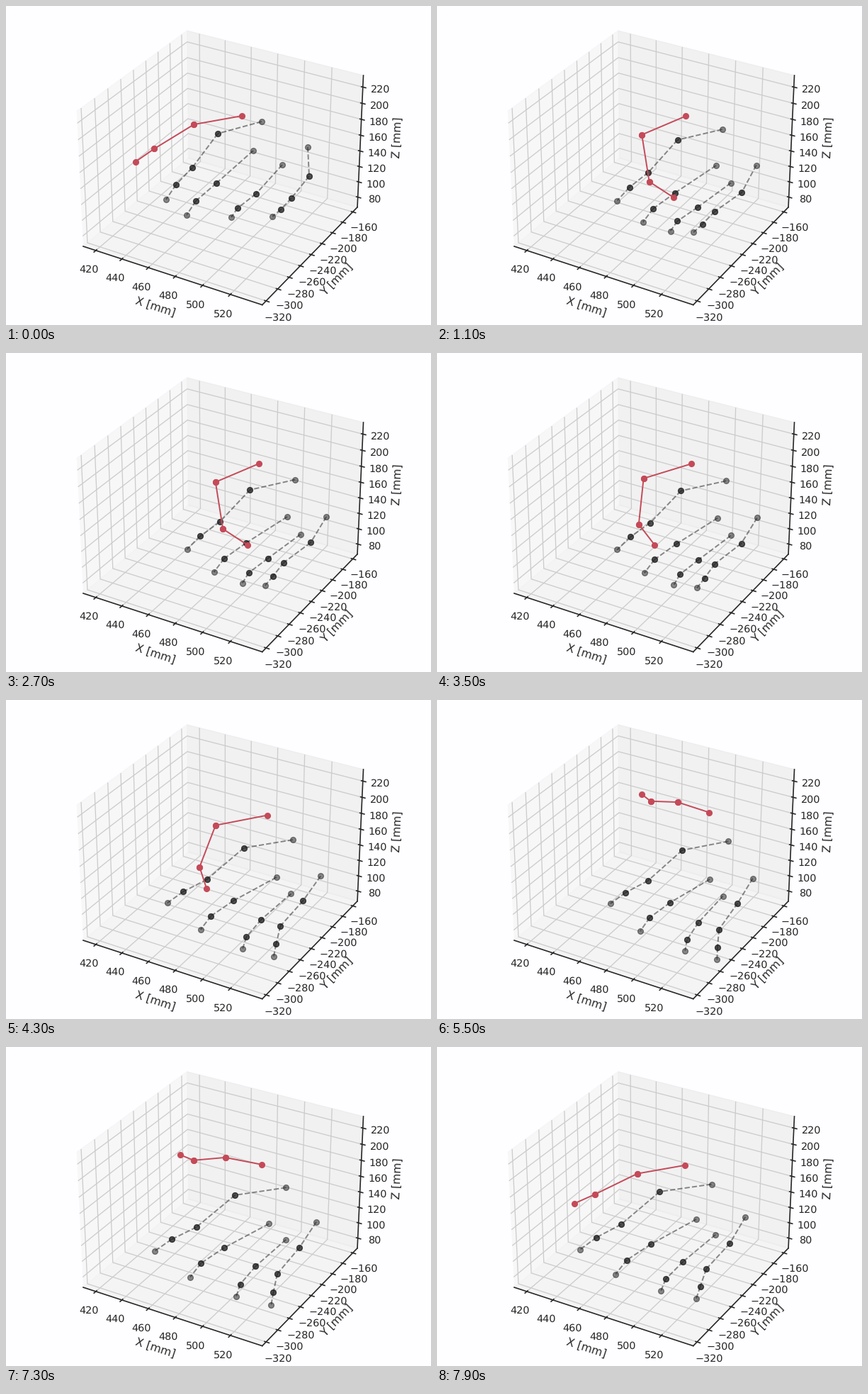
A matplotlib script that plays this animation: 600x450 px, repeating every 8000 ms.

```python
import numpy as np
import matplotlib.pyplot as plt
from matplotlib.animation import FuncAnimation

FRAMES, INTERVAL = 80, 100
W, H = 600, 450
RED, DARK, INK, PAPER = "#c54a58", ".1", ".15", "#fefdff"

plt.rcParams.update({
    "font.family": "DejaVu Sans", "text.hinting": "none",
    "axes.labelsize": 12, "axes.labelcolor": INK,
    "axes.edgecolor": INK, "axes.linewidth": 1.25,
    "axes.facecolor": PAPER, "figure.facecolor": PAPER,
    "grid.color": ".8", "grid.linewidth": 1,
    "xtick.labelsize": 11, "ytick.labelsize": 11,
    "xtick.color": INK, "ytick.color": INK,
    "xtick.major.width": 1.25, "ytick.major.width": 1.25,
    "lines.linewidth": 1.5, "lines.markersize": 6,
})

fig = plt.figure(figsize=(6.4, 4.8), dpi=93.75)

# Measuring volume
box = fig.add_axes([0, 0, 1, 1], projection="3d")
box.set(xlim=(410.2, 542.6), ylim=(-326.5, -150.7), zlim=(66.7, 234.2),
        xticks=range(420, 521, 20), yticks=range(-320, -159, 20),
        zticks=range(80, 221, 20),
        xlabel="X [mm]", ylabel="Y [mm]", zlabel="Z [mm]")

# Joints are complex numbers x + yj in stage pixels, y pointing down
stage = fig.add_axes([0, 0, 1, 1])
stage.set(xlim=(0, W), ylim=(H, 0))
stage.set_axis_off()


def hand_drift(t):
    """How far the hand has moved right, sunk and swung."""
    at = [0, 11, 27, 36, 43, 55, 66, 79]
    return np.array([np.interp(t, at, path) for path in (
        [0, 45, 48, 47, 33, 36, 28, 17],
        [0, 21, 27, 29, 46, 49, 53, 39],
        [0, -3, 0, 1, 4, 19, 7, -9])])


class Finger:
    """A chain whose two ends follow the hand while its bow flexes.

    The gains weigh right, sunk and swung for the knuckle and the tip.
    """

    def __init__(self, rest, knuckle_gain, tip_gain, bend):
        rest = np.array(rest)
        self.knuckle, self.tip = rest[0], rest[-1]
        self.shape = (rest - self.knuckle) / (self.tip - self.knuckle)
        self.bow = 1j * bend * np.sin(np.pi * self.shape.real)
        self.gains = np.array(knuckle_gain), np.array(tip_gain)

    def joints(self, t):
        drift = hand_drift(t)
        knuckle = self.knuckle + self.gains[0] @ drift
        tip = self.tip + self.gains[1] @ drift
        return knuckle + (tip - knuckle) * (self.shape + self.bow * drift[1])


FINGERS = [
    Finger([361+163j, 299+180j, 263+228j, 240+252j, 226+273j],
           [.75-.15j, .4+.85j, .2], [1.1-.15j, -.85+.4j, 1.1], -.0011),
    Finger([349+204j, 297+250j, 268+275j, 255+295j],
           [1, 1j, 0], [1-.1j, -.35+.7j, .7], .0007),
    Finger([390+224j, 353+265j, 327+285j, 318+298j],
           [.65+.1j, -.2+1j, 0], [.3-.15j, .05+1.25j, 1], .002),
    Finger([426+199j, 428+240j, 403+271j, 388+287j, 376+297j],
           [.55+.1j, 1j, 0], [-.3-.25j, .15+1.6j, 1.2], .0055),
]


def tapping_joints(t):
    """The tapping finger swings through lift, reach, bend and curl."""
    turns = np.interp(t, [0, 11, 66, 79], [-1.29, 0, 6.875, 8.25])
    deepest = np.interp(t, [27, 43], [3, 2])
    flex = deepest * (1 + np.cos(2 * np.pi * turns)) / 2

    def blend(*rows):
        return np.array([np.interp(flex, range(4), row) for row in rows])

    length = blend([47, 68, 74, 67], [38, 66, 63, 67], [16, 32, 32, 41])
    angle = blend([-18, 10, 11, 23], [-2, 26, 69, 99], [-38, 24, 108, 147])
    knuckle = 333+155j + np.array([.2-.15j, .55+.3j, .9-.3j]) @ hand_drift(t)
    steps = -length * np.exp(-1j * np.radians(angle))
    return knuckle + np.r_[0, np.cumsum(steps)]


def bones(count, **style):
    return [stage.plot([], [], marker="o", **style)[0] for _ in range(count)]


def place(lines, joints):
    for line, a, b in zip(lines, joints, joints[1:]):
        line.set_data([a.real, b.real], [a.imag, b.imag])


chains = [(f.joints, bones(len(f.shape) - 1, color=DARK, ls="--", alpha=0.5))
          for f in FINGERS]
chains.append((tapping_joints, bones(3, color=RED, ls="-")))


def update(t):
    for joints, lines in chains:
        place(lines, joints(t))
    return [line for _, lines in chains for line in lines]


anim = FuncAnimation(fig, update, frames=FRAMES, interval=INTERVAL,
                     init_func=lambda: update(0), repeat=True, repeat_delay=0)
plt.show()
```
